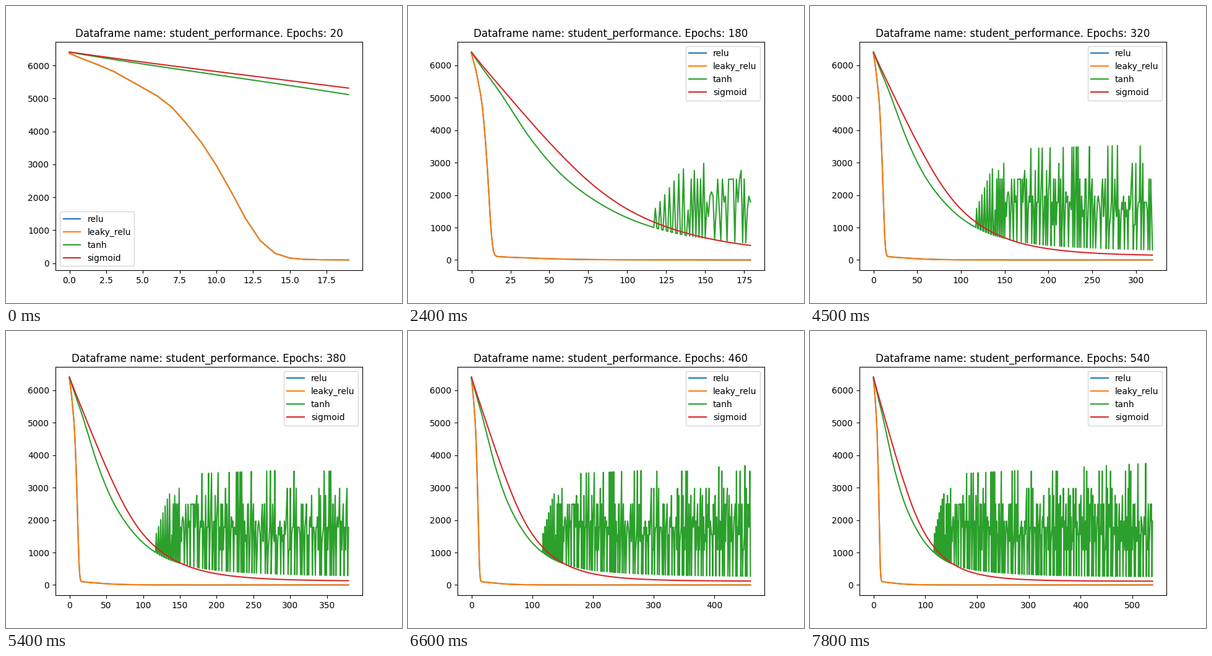
A matplotlib script for the animation above (8 s loop, 640x480 px).

```python
import numpy as np
import matplotlib.pyplot as plt
from matplotlib.animation import FuncAnimation

EPOCHS_PER_STEP = 20
FRAMES_PER_STEP = 3
FRAMES = 80
INTERVAL = 100
LAST_EPOCH = 540
UNSTABLE_FROM = 118


def decay(limit, knots):
    """Smooth curve through (epoch, loss) knots, settling exponentially at limit."""
    x, loss = np.array(knots, dtype=float).T
    y = np.log(loss - limit)
    slope = np.gradient(y, x)
    epoch = np.arange(LAST_EPOCH)
    i = np.clip(np.searchsorted(x, epoch, side="right") - 1, 0, len(x) - 2)
    h = x[i + 1] - x[i]
    t = (epoch - x[i]) / h
    log_excess = ((1 + 2 * t) * (1 - t) ** 2 * y[i]
                  + t * (1 - t) ** 2 * h * slope[i]
                  + t * t * (3 - 2 * t) * y[i + 1]
                  + t * t * (t - 1) * h * slope[i + 1])
    return limit + np.exp(log_excess)


def add_jumps(floor):
    """Short runs of random plateaus, each ending high and dropping to the floor."""
    rng = np.random.default_rng(4)
    plateaus = [1080, 1340, 1550, 1780, 1780, 1970, 2100, 2490]
    peaks = [1540, 1970, 2500, 2500, 2760, 2980, 3510, 3760]
    jumps = [0] * (UNSTABLE_FROM - 2)
    while len(jumps) < LAST_EPOCH:
        epoch = len(jumps)
        calm = 2 if epoch < 140 else 1
        run = 0 if epoch < 150 else rng.integers(0, 5)
        jumps += [0] * calm + [*rng.choice(plateaus, run), rng.choice(peaks)]
    ceiling = np.interp(np.arange(LAST_EPOCH),
                        [UNSTABLE_FROM, 135, 170, LAST_EPOCH],
                        [1590, 2790, 3430, 3760])
    return np.maximum(floor, np.minimum(jumps[:LAST_EPOCH], ceiling))


relu = decay(1, [
    (0, 6370), (4, 5575), (8, 4220), (10, 2970), (11, 2180), (12, 1350),
    (13, 680), (14, 300), (15, 155), (16, 115), (17, 105), (20, 96),
    (40, 55), (60, 26), (80, 11), (100, 5), (150, 1.5), (540, 1.1)])
tanh = decay(250, [
    (0, 6405), (20, 5045), (40, 3605), (60, 2530), (80, 1810), (100, 1300),
    (140, 740), (180, 510), (260, 358), (380, 285), (540, 258)])
sigmoid = decay(117, [
    (0, 6410), (20, 5258), (40, 4152), (60, 3120), (80, 2232), (100, 1567),
    (140, 800), (180, 442), (260, 200), (380, 130), (540, 118)])

LOSSES = {
    "relu": relu,
    "leaky_relu": relu,
    "tanh": add_jumps(tanh),
    "sigmoid": sigmoid,
}

fig, ax = plt.subplots(figsize=(6.4, 4.8), dpi=100)


def draw(frame):
    epochs = EPOCHS_PER_STEP * (1 + frame // FRAMES_PER_STEP)
    ax.clear()
    for name, loss in LOSSES.items():
        ax.plot(loss[:epochs], label=name)
    ax.set_title(f"Dataframe name: student_performance. Epochs: {epochs}")
    ax.legend()


anim = FuncAnimation(fig, draw, frames=FRAMES, interval=INTERVAL,
                     init_func=lambda: None, repeat=True, repeat_delay=0)
plt.show()
```
